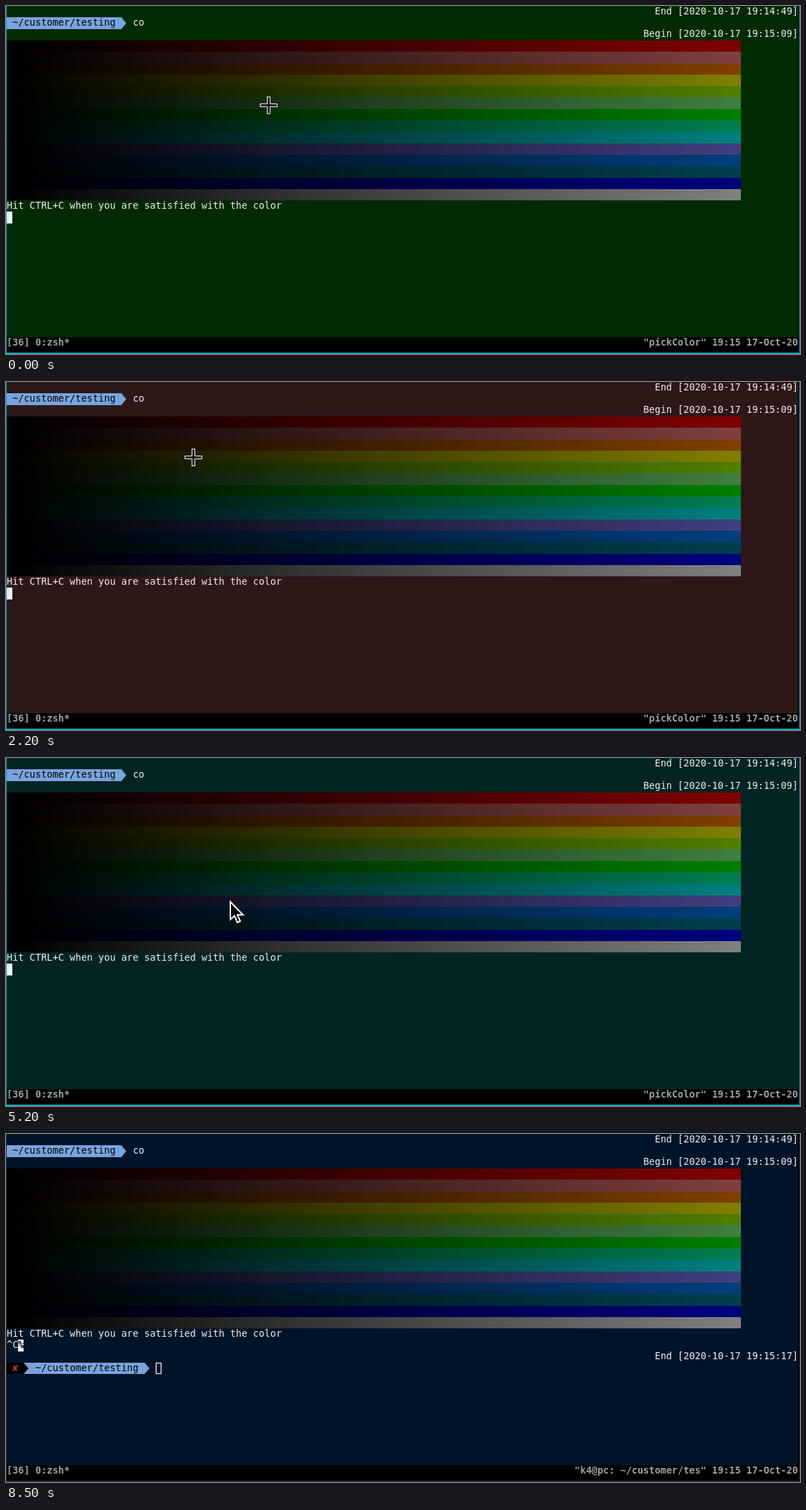
Recreate the animation shown at these times as an HTML page with a canvas. Size 1129 by 496 pixels, loop 8.6 s.

```html
<!DOCTYPE html>
<html lang="en">
<head>
<meta charset="utf-8">
<title>Terminal colour picker</title>
<style>
html, body { margin: 0; width: 100%; height: 100%; overflow: hidden; background: #000; }
canvas { display: block; }
</style>
</head>
<body>
<canvas id="stage" width="1129" height="496"></canvas>
<script>
const ctx = document.getElementById("stage").getContext("2d");
const LOOP = 8600, STEP = 100;
const W = 1129, H = 496;
const CELL_W = 8.155, CELL_H = 16.3, COLS = 138;
const SHADES = 128, FIRST_BAND = 3;
const INK = "#eeeeee", BLUE = "#78a4de", GRAY = "#a0a0a0";

const mix = (a, b, u = 0.5) => a.map((v, i) => v + (b[i] - v) * u);
const clamp = v => Math.min(1, Math.max(0, v));
const rgb = c => `rgb(${c.map(Math.floor).join(",")})`;

// Each band runs from black to half the brightness of its colour
const red = [1, 0, 0], green = [0, 1, 0], blue = [0, 0, 1];
const yellow = [1, 1, 0], cyan = [0, 1, 1], white = [1, 1, 1];
const petrol = [0, 0.5, 0.625];
const tint = c => mix(c, white);
const bands = [
  red, tint(red), mix(red, yellow), yellow, mix(yellow, green, 3 / 8),
  tint(green), green, mix(cyan, green, 3 / 8), cyan, tint(blue),
  mix(cyan, blue), petrol, blue, white
];
const shade = (band, col) => rgb(bands[band].map(v => v * col));

// The pointer travels to each spot, then clicks after a short hold
const moves = [
  { from: 0, to: 200, spot: [378, 139] },
  { from: 500, to: 1200, spot: [384, 73] },
  { from: 1500, to: 2200, spot: [266, 107] },
  { from: 2600, to: 3000, spot: [240, 167], bulge: [314, 111], hold: 200 },
  { from: 4000, to: 4600, spot: [301, 193] },
  { from: 4800, to: 5200, spot: [319, 205], arrow: true },
  { from: 5500, to: 5800, spot: [340, 217] }
];
const startSpot = [373, 141], firstPick = [350, 155];

function pointerAt(t) {
  return moves.reduce((pos, { from, to, spot, bulge = [0, 0] }) => {
    const u = clamp((t - from) / (to - from));
    const swing = Math.sin(Math.PI * u);
    return mix(pos, spot, u * u * (3 - 2 * u)).map((v, i) => v + bulge[i] * swing);
  }, startSpot);
}

function pickedColor(t) {
  const last = moves.filter(m => t >= m.to + (m.hold || STEP)).pop();
  const [x, y] = last ? last.spot : firstPick;
  return shade(Math.floor(y / CELL_H) - FIRST_BAND, Math.floor((x - 1) / CELL_W));
}

const colX = col => Math.round(1 + col * CELL_W);
const rowY = row => Math.round(row * CELL_H);

function box(x0, y0, x1, y1, color) {
  ctx.fillStyle = color;
  ctx.fillRect(x0, y0, x1 - x0, y1 - y0);
}

function cells(col, row, count, color) {
  box(colX(col), rowY(row), colX(col + count), rowY(row + 1), color);
}

function text(str, col, row, color = INK, weight = "") {
  ctx.font = `${weight} 13.54px "DejaVu Sans Mono", monospace`;
  ctx.fillStyle = color;
  ctx.fillText(str, 1 + col * CELL_W, Math.round(11.7 + row * CELL_H));
}

const textRight = (str, row, ...style) => text(str, COLS - str.length, row, ...style);

function polygon(points, color) {
  ctx.beginPath();
  points.forEach(p => ctx.lineTo(...p));
  ctx.closePath();
  ctx.fillStyle = color;
  ctx.fill();
}

function tip(col, row, color) {
  const x = colX(col), top = rowY(row), bottom = rowY(row + 1);
  polygon([[x, top], [x + 7, (top + bottom) / 2], [x, bottom]], color);
}

function promptPath(col, row) {
  const path = " ~/customer/testing ";
  cells(col, row, path.length, BLUE);
  tip(col + path.length, row, BLUE);
  text(path, col, row, "#000");
}

function drawBands() {
  bands.forEach((_, band) => {
    for (let col = 0; col < SHADES; col++) {
      cells(col, band + FIRST_BAND, 1, shade(band, col));
    }
  });
}

function crosshair(x, y) {
  const cx = Math.round(x) + 0.5, cy = Math.round(y) + 0.5;
  const cross = (arm, half, color) => {
    box(cx - arm, cy - half, cx + arm, cy + half, color);
    box(cx - half, cy - arm, cx + half, cy + arm, color);
  };
  cross(12.5, 2.5, "#fff");
  cross(11.5, 1.5, "#000");
}

function arrow(x, y) {
  const shape = [[0, 0], [0, 25], [6, 20], [10, 29.5], [14, 27.5], [10, 18.5], [18, 18.5]];
  polygon(shape.map(([dx, dy]) => [x + dx, y + dy]), "#000");
  ctx.strokeStyle = "#fff";
  ctx.lineWidth = 2;
  ctx.stroke();
}

function drawBorder(fade) {
  const color = rgb(mix([0, 164, 184], [38, 38, 42], fade));
  box(0, 0, 1, H, color);
  box(W - 1, 0, W, H, color);
  box(0, H - 2, W, H, color);
}

function drawNewPrompt(focused) {
  cells(2, 18, 1, INK);
  text("%", 2, 18, "#000", "bold");
  textRight("End [2020-10-17 19:15:17]", 19);
  cells(0, 20, 3, "#000");
  text("✘", 1, 20, "#b0443c");
  promptPath(4, 20);
  cells(3, 20, 1, BLUE);
  tip(3, 20, "#000");
  if (focused) {
    cells(26, 20, 1, INK);
  } else {
    ctx.strokeStyle = INK;
    ctx.lineWidth = 1.3;
    ctx.strokeRect(colX(26) + 0.5, rowY(20) + 0.5, 7, 15);
  }
}

function draw(t) {
  const interrupted = t >= 6900, done = t >= 7000;
  box(0, 0, W, H, "#000");
  box(1, 0, 1126, 472, pickedColor(t));

  textRight("End [2020-10-17 19:14:49]", 0);
  promptPath(0, 1);
  text("co", 22, 1);
  textRight("Begin [2020-10-17 19:15:09]", 2);
  drawBands();
  text("Hit CTRL+C when you are satisfied with the color", 0, 17);

  if (interrupted) text("^C", 0, 18);
  if (done) drawNewPrompt(t < 7700);
  else cells(interrupted ? 2 : 0, 18, 1, INK);

  text("[36] 0:zsh*", 0, 29, GRAY, "bold");
  const title = done ? "k4@pc: ~/customer/tes" : "pickColor";
  textRight(`"${title}" 19:15 17-Oct-20`, 29, GRAY, "bold");

  if (!interrupted) {
    const pointer = moves.some(m => m.arrow && m.to === t) ? arrow : crosshair;
    pointer(...pointerAt(t));
  }
  drawBorder(clamp((t - 7600) / 500));
}

const start = performance.now();
function tick() {
  const t = (performance.now() - start) % LOOP;
  draw(Math.floor(t / STEP) * STEP);
  requestAnimationFrame(tick);
}
tick();
</script>
</body>
</html>
```
